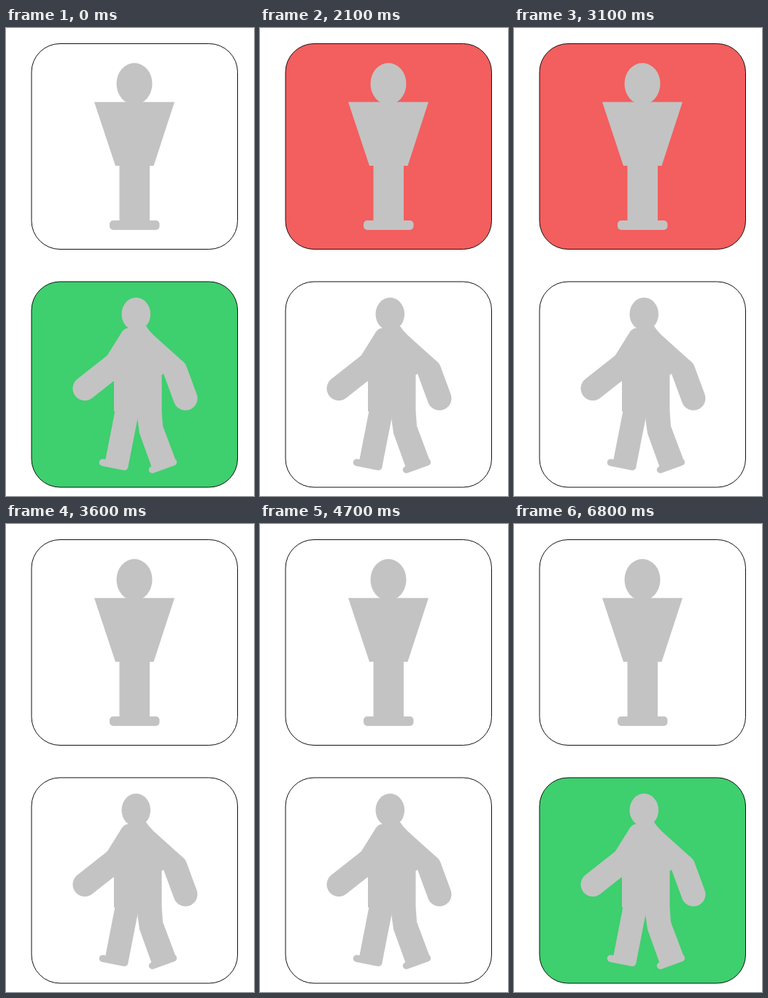
An HTML page for the animation above (7.2 s loop, 340 by 642 pixels).

```html
<!DOCTYPE html>
<html lang="en">
<head>
<meta charset="utf-8">
<title>Pedestrian light</title>
<style>
  html, body { margin: 0; width: 100%; height: 100%; overflow: hidden; background: #fff; }
  svg { display: block; }
  .panel { fill: #fff; stroke: #111; stroke-width: 1; }
  .figure { fill: #c3c3c3; }
  .limb { stroke: #c3c3c3; stroke-linecap: round; }
</style>
</head>
<body>
<svg width="340" height="642" viewBox="0 0 340 642">
  <rect id="stop" class="panel" x="35" y="21.5" width="282.5" height="282" rx="39"/>
  <g class="figure">
    <ellipse cx="176" cy="76.5" rx="24.5" ry="28.5"/>
    <path d="M121 101.5H231L202.5 189H197V265H155.5V189H150Z"/>
    <rect x="142" y="264" width="68.5" height="13" rx="5"/>
  </g>

  <rect id="walk" class="panel" x="35" y="348" width="282.5" height="282" rx="39"/>
  <g class="figure">
    <ellipse cx="178.3" cy="392.5" rx="19.8" ry="22.7"/>
    <path d="M165 412Q160 414 157 420L137 452 148 486V526H213.5V476L242 457 202 421Q196 415 192 409Z"/>
    <path d="M149.5 525H183L180 538 167 604 136 594Z"/>
    <path d="M180 525H213.5L215 546 233 594 201 606 183 556 180.5 538Z"/>
    <path class="limb" stroke-width="33" d="M108 494.5L148 463M246 508L232 470"/>
    <path class="limb" stroke-width="9.5" d="M132.5 596L162.5 602M200.5 606L229.5 595.5"/>
  </g>
</svg>
<script>
  const LOOP = 7200;
  const stop = document.getElementById("stop");
  const walk = document.getElementById("walk");

  function draw(now) {
    const t = now % LOOP;
    const walking = t < 1600 || t >= 5200;
    // The stop light flashes three times, half a second on and off.
    const stopping = t >= 2100 && t < 4600 && (t - 2100) % 1000 < 500;
    walk.style.fill = walking ? "#3ecf6e" : "#fff";
    stop.style.fill = stopping ? "#f35e5e" : "#fff";
  }

  const start = performance.now();
  function tick() {
    draw(performance.now() - start);
    requestAnimationFrame(tick);
  }
  tick();
</script>
</body>
</html>
```
